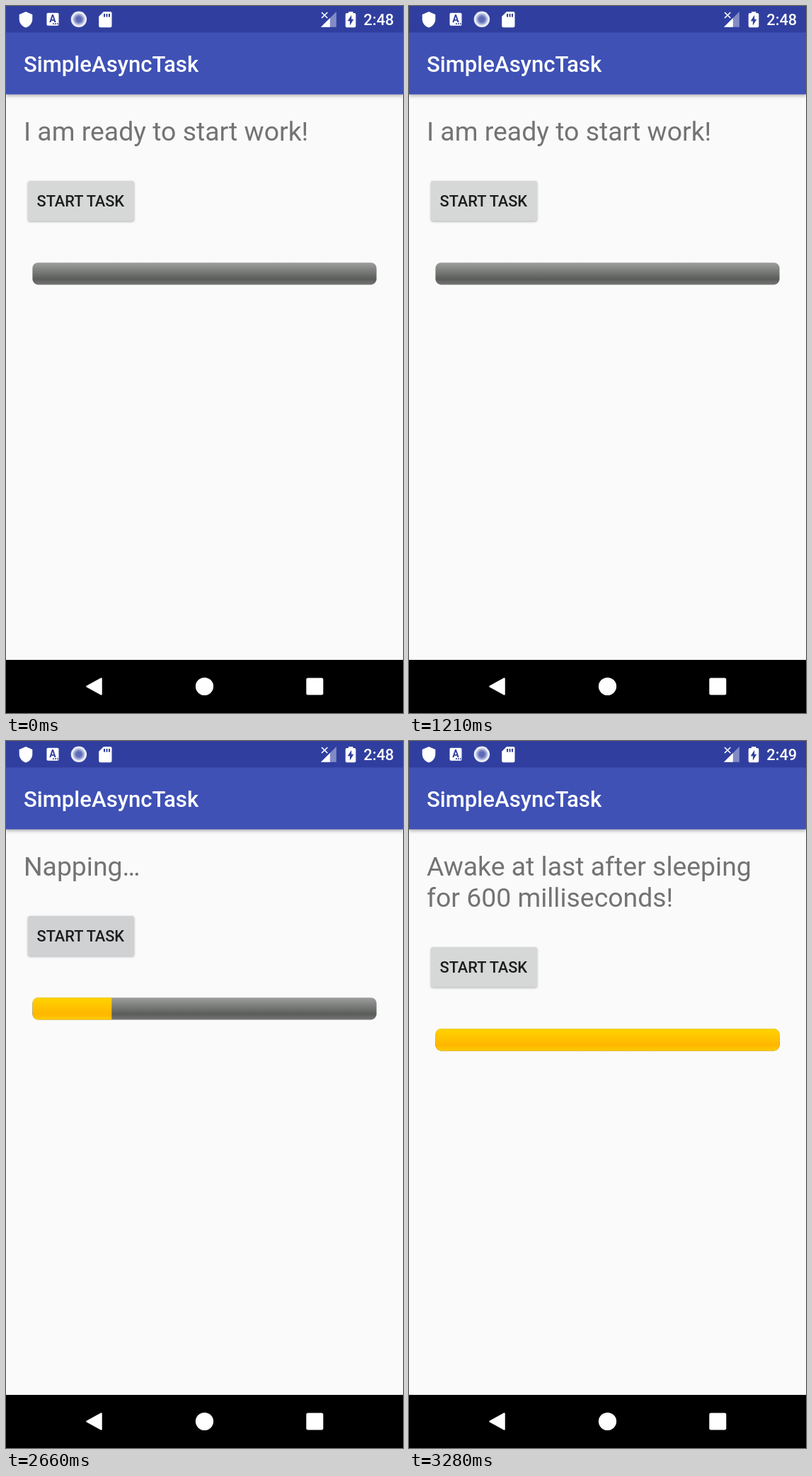
An HTML page that plays this animation: 561x998 px, repeating every 5.1 s.

```html
<!DOCTYPE html>
<html lang="en">
<head>
<meta charset="utf-8">
<title>Async task demo</title>
<style>
  html, body { margin: 0; width: 100%; height: 100%; overflow: hidden; background: #fafafa; }
  svg { display: block; width: 100vw; height: 100vh; font-family: Roboto, sans-serif; }
  .medium { font-weight: 500; }
  #appBar { filter: drop-shadow(0 2px 2.5px rgba(0, 0, 0, .32)); }
  #button { filter: drop-shadow(0 1.5px 1.5px rgba(0, 0, 0, .3)); }
</style>
</head>
<body>
<svg viewBox="0 0 561 998">
  <defs>
    <linearGradient id="track" x2="0" y2="1">
      <stop stop-color="#9d9e9d"/><stop offset=".75" stop-color="#5a5d5a"/><stop offset="1" stop-color="#747674"/>
    </linearGradient>
    <linearGradient id="fill" x2="0" y2="1">
      <stop stop-color="#ffd300"/><stop offset=".75" stop-color="#ffb600"/><stop offset="1" stop-color="#ffcb00"/>
    </linearGradient>
    <clipPath id="done"><rect id="doneRect" x="37.4" y="362" height="32"/></clipPath>
  </defs>
  <rect width="561" height="998" fill="#fafafa"/>

  <rect id="appBar" y="0" width="561" height="124.7" fill="#3f51b5"/>
  <rect width="561" height="37.4" fill="#303f9f"/>
  <text class="medium" x="24.9" y="93" font-size="31.15" fill="#fff">SimpleAsyncTask</text>

  <!-- status icons -->
  <g fill="#fff">
    <path d="M28 8L37.3 12V18.5C37.3 24 33.5 28.8 28 30.4C22.5 28.8 18.7 24 18.7 18.5V12Z"/>
    <rect x="57.5" y="9.8" width="17" height="18" rx="1.8"/>
    <g fill="#303f9f">
      <text x="66" y="22.6" font-size="14" font-weight="700" text-anchor="middle">A</text>
      <path d="M66 24.3h1.8v1.6H66zM69 24.3h1.8v1.6H69zM72 24.3h1.6v1.6H72z"/>
    </g>
    <circle cx="102.9" cy="18.8" r="11.2" fill="#e9ebf6"/>
    <circle cx="102.9" cy="18.8" r="7.2" fill="#7c88c6" stroke="#aeb6de" stroke-width="2"/>
    <circle cx="102.9" cy="18.8" r="4.2" fill="#5d6bb5"/>
    <path d="M138 8H147.3Q149.5 8 149.5 10.2V28Q149.5 30.2 147.3 30.2H133.4Q131.2 30.2 131.2 28V14.8Z"/>
    <path d="M138 11h2v4.5h-2zM141.5 11h2v4.5h-2zM145 11h2v4.5h-2z" fill="#303f9f"/>
    <path d="M466.8 8V29.8H445Z" opacity=".4"/>
    <path d="M457.8 17V29.8H445Z"/>
    <path d="M446 9L454.3 17M454.3 9L446 17" stroke="#fff" stroke-width="1.7"/>
    <path d="M484 10V8H490.3V10H492.4Q494.3 10 494.3 12V28.3Q494.3 30.2 492.4 30.2H481.6Q479.7 30.2 479.7 28.3V12Q479.7 10 481.6 10Z"/>
    <path d="M488.2 12.8V18.7H491.3L485.9 27.5V21.2H482.7Z" fill="#303f9f"/>
    <text id="clock" class="medium" x="505.3" y="27" font-size="21.8"></text>
  </g>

  <g font-size="37.38" fill="#737373">
    <text id="line1" x="24.9" y="190"></text>
    <text id="line2" x="24.9" y="234"></text>
  </g>

  <g id="controls">
    <rect id="button" x="31" y="247" width="150" height="56.5" rx="3"/>
    <text class="medium" x="43.6" y="283.4" font-size="21.8" fill="#1c1c1c">START TASK</text>
    <rect x="37.4" y="362.3" width="486.2" height="31.1" rx="7.8" fill="url(#track)"/>
    <rect x="37.4" y="362.3" width="486.2" height="31.1" rx="7.8" fill="url(#fill)" clip-path="url(#done)"/>
  </g>

  <!-- navigation bar -->
  <rect y="923" width="561" height="75" fill="#000"/>
  <g fill="#fff">
    <path d="M114.5 960.5L134.5 949.5V971.5Z" stroke="#fff" stroke-width="2.5" stroke-linejoin="round"/>
    <circle cx="280.5" cy="960.5" r="12.6"/>
    <rect x="424.3" y="948.6" width="24" height="23.8" rx="2.2"/>
  </g>
</svg>
<script>
const LOOP = 5100, START = 2490, STALL = 2820, RESUME = 3030, AWAKE = 3240, SETTLED = 3280;
const STEP = 41.25, TASK = 717, BAR_WIDTH = 486.2;
const byId = id => document.getElementById(id);
const [clock, line1, line2, controls, button, doneRect] =
  ["clock", "line1", "line2", "controls", "button", "doneRect"].map(byId);

const clamp = v => Math.max(0, Math.min(1, v));

function render(t) {
  const awake = t >= AWAKE;
  const shown = t >= STALL && t < RESUME ? STALL : t;
  const elapsed = Math.floor((shown - START) / STEP + .001) * STEP;
  const press = t < SETTLED ? clamp(elapsed / (STALL - START)) : 0;

  clock.textContent = awake ? "2:49" : "2:48";
  line1.textContent = awake ? "Awake at last after sleeping"
    : t >= START ? "Napping…" : "I am ready to start work!";
  line2.textContent = awake ? "for 600 milliseconds!" : "";
  controls.setAttribute("transform", `translate(0 ${awake ? 44 : 0})`);
  button.setAttribute("fill", `rgb(${214 - 14 * press},${215 - 13 * press},${215 - 11 * press})`);
  doneRect.setAttribute("width", BAR_WIDTH * clamp(elapsed / TASK));
}

const begin = performance.now();
function frame() {
  render((performance.now() - begin) % LOOP);
  requestAnimationFrame(frame);
}
frame();
</script>
</body>
</html>
```
